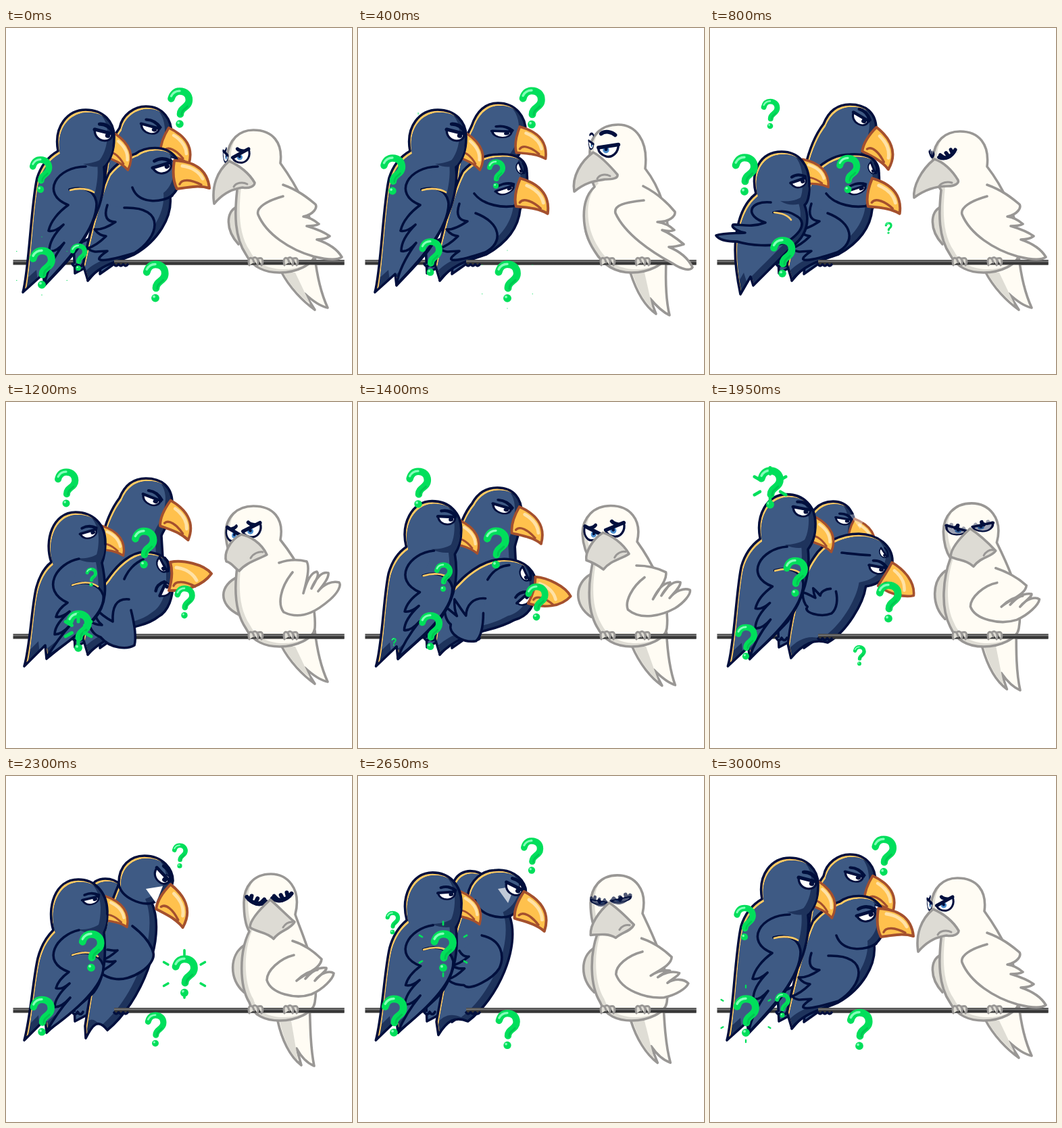
An HTML page for the animation above (3050 ms loop, 512 by 512 pixels).

```html
<!DOCTYPE html>
<html lang="en">
<head>
<meta charset="utf-8">
<title>Birds on a wire</title>
<style>
html, body { margin: 0; width: 100%; height: 100%; overflow: hidden; background: #fff; }
svg { display: block; width: 100vw; height: 100vh; }
path, use { stroke-linecap: round; stroke-linejoin: round; }
.ink { stroke: #000f3d; stroke-width: 3.6; }
.gray { stroke: #999795; stroke-width: 3.6; }
.none { fill: none; }
.blue { fill: #3e5a84; }
.navy { fill: #1e335c; }
.gold { fill: #ffca64; }
.glow { fill: none; stroke: #ffca64; stroke-width: 2.6; }
.bill { fill: #ffc14d; stroke: #a4502e; stroke-width: 4; }
.cream { fill: #fffcf4; }
.stone { fill: #dfddd5; }
.brow { fill: none; stroke: #000f3d; stroke-width: 6; }
</style>
</head>
<body>
<svg viewBox="0 0 512 512">
<defs>
  <linearGradient id="steel" x2="0" y2="1">
    <stop stop-color="#3c3c3c"/><stop offset=".3" stop-color="#7a7a7a"/><stop offset=".6" stop-color="#333"/><stop offset="1" stop-color="#3c3c3c"/>
  </linearGradient>
  <path id="A"/><path id="B"/><path id="C"/><path id="W"/>
  <clipPath id="clipA"><use href="#A"/></clipPath>
  <clipPath id="clipB"><use href="#B"/></clipPath>
  <clipPath id="clipC"><use href="#C"/></clipPath>
  <clipPath id="clipW"><use href="#W"/></clipPath>
  <g id="gloss" fill="none">
    <path d="M11-13C25-11 36-4 41 6" stroke="#ffe2a6" stroke-width="5"/>
    <path d="M7 14C10 6 24 7 39 15" stroke="#a4502e" stroke-width="3.5"/>
  </g>
  <g id="beak">
    <path class="bill" d="M-1-21C25-20 48-10 51 20C35 15 18 19 3 21C-4 8-3-8-1-21Z"/>
    <use href="#gloss"/>
  </g>
  <g id="eye">
    <path class="ink" fill="#fff" d="M-14-8L14-3C14 8 6 11 0 10C-8 9-14 2-14-8Z"/>
    <circle cx="7" cy="1" r="4" fill="#000f3d"/>
    <path class="brow" d="M-14-8L14-3M-7-18C1-19 9-15 15-6" stroke-width="5"/>
  </g>
  <g id="paleEye">
    <g id="open">
      <path class="ink" fill="#fff" d="M-15 0L15-9C17 4 8 13-1 12C-9 11-15 6-15 0Z"/>
      <circle cx="-3" cy="2" r="5" fill="#4b8fd0"/>
      <circle cx="-3" cy="1" r="2.6" fill="#000f3d"/>
      <path class="brow" d="M-15 0L15-9"/>
    </g>
    <path class="brow" id="brow"/>
    <path class="brow" id="shut" d="M-14 0C-6 7 6 5 15-5M-6 3L-11-3M2 3L-1-4M9-1L8-7"/>
  </g>
  <g id="foot">
    <path class="stone" stroke="#999795" stroke-width="3" d="M-9 6C-13-6-4-9-2 2M-4-4C2-9 6 0 3 6M4-4C12-7 12 2 9 6"/>
  </g>
  <g id="mark">
    <path d="M-13-14C-11-22-6-25.5 0-25.5C9-25.5 14.5-20 14.5-12C14.5 0 1-1 1 10" fill="none" stroke="#00df5b" stroke-width="11"/>
    <path d="M12-2C8 3 3 3 3 11" fill="none" stroke="#00c752" stroke-width="3"/>
    <path d="M-13-18C-10-24-6-26 0-26" fill="none" stroke="#83ffb9" stroke-width="3.5"/>
    <circle cy="25" r="6" fill="#00df5b"/>
    <circle cx="-2" cy="23" r="2" fill="#83ffb9"/>
  </g>
</defs>

<rect x="10.5" y="343" width="490" height="7.5" fill="url(#steel)"/>

<g id="backBird"></g>
<use id="beakB" href="#beak"/><use id="eyeB" href="#eye"/>

<path class="ink blue" d="M102 363L100 322L150 300L166 345L139 364L140 352L121 374L119 354Z"/>
<g id="midBird"></g>
<path id="throat" fill="#fff" d="M207 167L232 163L222 188Z"/>
<path class="ink none" id="chinC"/>
<use id="eyeC2" href="#eye"/><use id="eyeC" href="#eye"/>
<g id="beakC"><path class="bill" id="billC"/><use href="#gloss"/></g>

<path class="gray stone" id="wingW2"/>
<path class="gray cream" id="tailW"/>
<path id="tailShade" class="stone"/>
<g id="paleBird"></g>
<rect x="160" y="343" width="340.5" height="7.5" fill="url(#steel)"/>
<path class="ink blue" d="M98 349q4 7 8 0q4 7 8 0M160 350q3 4 6 0m1 0q3 4 6 0m1 0q3 4 6 0"/>
<path class="ink blue" id="wingC"/>

<use id="beakA" href="#beak"/>
<g id="frontBird"></g>
<path class="navy" id="chinA"/>
<path class="ink blue" id="wingA"/><path class="glow" id="glowA"/>
<use id="eyeA" href="#eye"/>

<use href="#foot" x="369" y="345"/><use href="#foot" x="421" y="345"/>
<path class="gray cream" id="wingW"/>
<use id="eyeW2" href="#paleEye"/><use id="eyeW" href="#paleEye"/>
<path class="gray" fill="#dddbd4" id="beakW"/>
<path class="none" stroke="#999795" stroke-width="3" id="mouthW"/>
<g id="marks"></g>
</svg>

<script>
const LOOP = 3050, STEP = 50;
const $ = id => document.getElementById(id);
const number = /-?\d*\.?\d+/g;

// Rim light on the upper left, shade on the lower right.
const darkBird = id => `<g clip-path="url(#clip${id})">
  <use href="#${id}" class="gold"/><use href="#${id}" x="3" y="4" class="navy"/>
  <g clip-path="url(#clip${id})" transform="translate(-10 -6)"><use href="#${id}" x="13" y="10" class="blue"/></g>
  </g><use href="#${id}" class="ink none"/>`;
$('backBird').innerHTML = darkBird('B');
$('midBird').innerHTML = darkBird('C');
$('frontBird').innerHTML = darkBird('A');
$('paleBird').innerHTML = `<g clip-path="url(#clipW)"><use href="#W" class="stone"/>
  <use href="#W" x="6" y="-5" class="cream"/></g><use href="#W" class="gray none"/>`;

// Six poses per part; a plain number repeats an earlier pose.
const tracks = [];
const track = (attr, id, poses) =>
  tracks.push({ attr, el: $(id), poses: poses.map(p => typeof p === 'number' ? poses[p] : p) });
const shape = (id, ...poses) => track('d', id, poses);
const fade = (id, ...poses) => track('opacity', id, poses);
const place = (id, ...poses) => track('transform', id, poses.map(p => {
  if (typeof p === 'number') return p;
  const [x, y, r, s, k = s] = p.split(' ');
  return `translate(${x} ${y}) rotate(${r}) scale(${s} ${k})`;
}));

// Front dark bird
shape('A',
  'M25 391C34 360 37 260 46 222C52 203 63 190 77 182C70 145 92 121 118 121C143 121 161 138 160 163C160 182 154 196 145 206C149 240 135 285 105 328C92 345 75 362 57 381L55 364Z', 0,
  'M45 394C38 360 36 330 38 312C42 275 55 255 68 245C60 215 72 183 106 183C130 183 148 200 147 235C147 250 145 258 140 262C150 290 140 310 120 325C100 345 85 360 64 381L60 368Z',
  'M27 391C36 360 38 300 45 274C50 256 58 244 67 237C56 205 69 163 103 163C128 163 147 180 147 208C147 222 145 230 142 238C149 272 150 300 130 322C105 345 87 357 60 380L58 360Z',
  'M26 391C36 360 38 262 46 226C52 207 63 194 77 186C72 150 92 126 118 126C143 126 161 143 160 168C160 187 154 200 145 209C149 242 135 285 105 328C92 345 75 362 58 381L56 364Z',
  'M27 391C36 360 40 300 47 270C52 250 60 238 70 228C60 195 72 153 107 153C130 153 149 170 150 200C150 215 148 225 145 232C149 270 145 300 130 320C105 345 85 355 60 380L58 360Z');
shape('chinA', 'M114 201C128 207 138 206 146 203C154 193 157 184 158 174C152 190 138 200 114 201Z', 0,
  'M104 256C116 264 130 262 139 258C144 250 146 244 146 234C142 250 128 258 104 256Z',
  'M104 231C116 238 130 238 140 236C145 228 146 220 146 210C142 224 128 233 104 231Z', 0,
  'M106 227C120 234 134 233 143 231C148 223 149 214 149 204C144 219 130 228 106 227Z');
shape('wingA',
  'M118 205C75 205 50 245 92 262C78 272 66 286 63 300C70 302 78 297 85 291C72 304 64 318 64 330C72 332 80 325 86 318C70 340 60 360 57 380C85 350 134 300 134 260C132 238 110 234 94 239', 0,
  'M90 258C58 255 50 278 82 288C60 296 45 290 34 291C30 296 45 302 52 303C35 304 20 303 9 307C14 315 30 316 40 316C60 322 90 324 112 318C140 300 142 285 126 277C115 270 105 270 94 273',
  'M108 232C75 238 50 278 91 297C82 303 76 310 74 318C82 319 88 315 94 310C82 321 72 332 72 344C80 344 88 338 95 330C80 347 70 362 60 378C100 350 148 315 144 286C138 268 115 264 98 271', 0,
  'M108 228C75 235 50 275 93 290C82 298 76 306 74 314C82 316 88 312 94 307C82 318 72 330 72 342C80 342 88 336 95 328C80 345 70 360 60 378C100 350 147 310 144 280C138 262 115 258 98 265');
shape('glowA', 'M95 240C108 236 122 238 130 243', 0, 'M95 273C108 274 116 278 120 284',
  'M98 271C115 265 128 267 136 273', 0, 'M98 265C115 259 128 261 136 267');
place('beakA', '152 172 32 .87', 0, '135 212 9 .85', '138 200 16 .82', '152 181 34 .87', '143 195 17 .84');
place('eyeA', '144 158 5 .95 .85', 0, '132 229 -28 .8 .7', '123 195 -24 .85 .65', '142 147 17 .95 .85', '126 184 -20 .85 .6');

// Back dark bird
shape('B',
  'M146 225C150 190 155 165 168 148C172 128 190 116 207 116C232 116 246 135 245 160C244 180 235 190 225 200L205 265L135 295Z',
  'M146 215C150 185 158 165 168 145C176 122 190 111 207 111C232 111 250 130 248 158C246 178 238 190 228 200L205 265L135 295Z',
  'M141 205C148 175 158 155 168 142C176 122 190 113 207 113C230 113 246 125 246 150C244 180 232 190 230 198L234 265L135 295Z', 2,
  'M140 225C152 190 160 170 170 160C180 148 192 144 205 144C230 144 240 165 237 190C235 215 235 225 235 235L236 270L130 300Z',
  'M108 220C116 185 122 165 132 156C137 153 142 152 147 152C165 152 178 165 180 185C180 195 180 205 178 215L170 270L125 290Z');
place('beakB', '234 166 23 .93', '236 165 13 .92', '235 164 36 .98', '235 164 28 .97', '229 187 13 .95', '178 192 30 .6');
place('eyeB', '213 149 8 .95 .7', '213 156 -4 1 .6', '222 135 22 .9 .75', '215 145 14 .95 .7', '210 174 4 1 .6', '178 178 0 .5');

// Middle dark bird
shape('C',
  'M121 373L114 350C125 300 140 240 152 215C165 198 185 188 192 186C205 176 235 172 250 190C262 205 262 235 243 250C246 280 225 315 190 335C160 348 140 350 121 373Z',
  'M121 373L114 350C125 300 140 240 155 212C170 195 190 187 207 187C235 185 250 195 250 215C252 240 248 255 240 268C238 290 225 315 190 335C160 345 140 350 121 373Z', 1,
  'M121 373L114 350C120 310 130 285 150 262C165 240 185 222 205 222C235 222 248 240 247 262C248 290 240 310 225 318C210 330 195 330 185 335C165 345 145 350 121 373Z',
  'M121 373L114 350C118 310 128 285 145 275C170 255 200 245 230 245C260 246 285 262 285 288C284 310 268 326 240 328C220 335 205 342 190 343C165 345 145 350 121 373Z',
  'M118 388L117 370C125 320 140 220 167 160C166 132 185 118 205 118C232 118 247 138 247 155C245 170 232 182 216 188C238 240 200 335 150 376C136 358 128 368 118 388Z');
shape('wingC',
  'M150 262C144 280 150 287 162 287C150 295 140 299 131 298C137 306 142 307 148 308C138 318 130 323 121 326C130 334 137 330 150 330C120 350 150 345 190 333C225 312 240 264 175 266',
  'M150 260C144 278 150 285 162 286C150 294 140 299 131 298C137 306 142 307 148 308C138 318 130 323 121 326C130 334 137 330 150 330C120 350 150 345 188 332C216 318 212 288 174 274', 1,
  'M182 292C162 290 157 305 158 325C145 318 138 312 130 303C132 320 136 325 142 330C134 330 128 328 121 322C125 340 132 345 140 348C155 366 180 366 190 360C194 345 188 320 185 308',
  'M197 289C180 288 165 295 162 305C163 295 162 285 159 278C155 283 152 290 152 300C148 290 144 280 136 277C132 290 132 300 134 305C105 315 125 345 155 346C172 345 182 330 186 318',
  'M150 257C158 258 162 259 165 258C156 266 150 270 143 272C150 276 156 275 162 274C152 284 146 286 138 290C146 296 152 299 160 300C185 305 222 280 218 262C214 245 200 232 187 222');
shape('chinC', 'M187 236C196 262 232 258 246 248', 'M172 245C185 262 215 268 238 262', 1,
  'M175 262C180 250 190 238 203 233', 'M213 264C222 252 235 248 250 252', 'M167 160C170 180 200 192 216 188');
const side = 'M-1 -21C25 -20 48 -10 51 20C35 15 18 19 3 21C-4 8 -3 -8 -1 -21Z';
shape('billC', side, 0, 0, 'M2 -21C20 -25 52 -18 63 -4C50 14 25 22 0 21C4 8 6 -8 2 -21Z',
  'M2 -23C24 -24 50 -17 63 -4C54 18 25 27 0 22C4 8 6 -8 2 -23Z', side);
place('beakC', '250 217 0 1', '236 243 14 1', 1, '241 258 0 1', '275 304 28 .87', '232 178 36 1');
place('eyeC', '232 207 -25 .95 .8', '218 240 -24 .95 .55', 1, '236 278 -75 .75', '259 311 -20 .8 .6', '230 149 38 .95 .8');
place('eyeC2', '248 194 10 .3', '239 208 60 .6 .45', 1, '230 242 55 .8 .6', '266 272 60 .7 .5', '240 150 30 .3');
fade('throat', '0', 0, 0, 0, 0, '1');

// Pale bird
const belly = 'C365 355 385 362 405 362C430 362 455 350 457 335';
shape('W',
  `M342 240C338 275 338 310 355 335${belly}C460 290 435 240 406 200C410 170 395 151 366 151C345 151 330 165 327 190C327 215 335 230 342 240Z`,
  `M350 235C328 255 330 300 350 330${belly}C465 290 450 240 425 208C430 165 410 143 385 143C360 143 342 160 343 185C342 210 345 225 350 235Z`,
  `M342 240C338 275 338 310 355 335${belly}C460 290 437 240 410 205C414 172 398 153 370 153C348 153 332 167 330 192C329 215 335 230 342 240Z`,
  `M342 245C338 275 338 310 355 335${belly}C460 290 435 240 406 204C412 172 395 154 366 154C342 154 325 170 325 195C326 220 335 235 342 245Z`,
  `M353 232C345 260 338 300 352 330${belly}C465 290 440 240 422 210C432 175 410 153 384 153C358 153 341 172 341 195C342 215 348 225 353 232Z`,
  `M360 230C345 260 345 310 360 335${belly}C465 290 440 240 428 205C438 165 415 145 392 145C365 145 352 165 352 187C352 210 355 222 360 230Z`);
shape('tailW',
  'M407 360C420 385 440 405 457 417L442 393C455 405 465 412 476 414C465 390 460 365 457 338',
  'M403 362C412 390 425 412 441 423L432 400C442 412 450 420 461 425C455 400 455 370 456 345', 0, 0, 1,
  'M402 362C408 390 420 415 437 428L430 403C438 418 446 425 456 429C450 400 450 360 449 325');
shape('tailShade', 'M410 362C422 383 437 399 450 408L428 362Z', 'M406 363C414 388 424 406 436 416L424 362Z', 0, 0, 1,
  'M405 363C411 390 420 410 432 421L422 362Z');
shape('wingW2', 'M341 265C326 272 324 298 344 320', 'M345 250C332 265 332 300 345 320', 0,
  'M345 258C315 270 313 300 345 315', 'M345 250C327 265 325 300 345 322', 'M353 250C330 265 330 300 352 320');
shape('wingW',
  'M410 249C385 256 370 266 373 276C385 305 420 328 455 338C475 343 490 344 497 339C490 327 475 318 460 313C468 313 475 311 479 308C468 300 455 296 445 293C452 293 458 293 463 290C455 283 447 280 440 279C455 276 461 266 458 261C445 250 432 240 410 232',
  'M423 255C395 258 378 262 381 274C395 305 435 332 465 348C480 358 492 360 495 354C488 340 475 330 460 324C468 324 476 322 482 320C470 310 460 303 450 299C458 301 464 301 468 299C460 291 450 288 443 287C462 287 470 278 469 272C455 255 440 243 422 234', 0,
  'M424 252C405 275 402 300 411 311C440 325 465 305 480 292C490 283 497 272 493 267C482 264 470 270 462 280C470 270 478 260 477 253C467 250 458 262 452 276C460 262 464 255 460 251C452 252 445 265 440 283C445 265 450 245 445 236C430 232 415 234 404 238',
  'M424 269C405 272 385 290 385 303C392 322 430 330 455 322C472 315 488 300 489 292C484 288 470 290 460 303C470 292 478 288 477 284C465 282 452 290 445 300C455 290 460 287 464 287C450 288 440 295 432 303C445 292 468 285 469 272C455 260 437 252 422 247',
  'M426 265C405 270 386 288 386 302C392 322 428 331 452 323C470 315 484 300 485 292C480 288 466 290 457 303C467 292 475 288 474 284C462 282 450 290 443 300C452 290 457 287 461 287C448 288 438 295 430 303C443 292 466 285 467 271C453 257 437 248 424 244');
shape('beakW',
  'M330 197C312 212 304 235 308 260C325 240 340 238 350 236C360 238 368 234 368 229C360 215 345 203 330 197Z',
  'M348 184C330 197 316 220 320 242C340 226 355 226 365 224C378 224 385 222 384 217C372 203 360 190 348 184Z',
  'M332 194C312 210 300 235 302 251C322 236 340 234 352 234C362 234 369 230 367 225C358 210 345 198 332 194Z',
  'M348 196C330 205 322 225 326 236C335 238 338 246 345 250C355 238 370 234 386 226C378 208 360 198 348 196Z',
  'M381 190C370 200 353 218 353 232C365 237 375 235 386 245C400 228 412 232 420 223C408 208 392 196 381 190Z',
  'M391 183C378 195 361 212 361 224C372 232 385 230 396 241C405 228 420 228 427 216C415 206 402 192 391 183Z');
shape('mouthW', 'M337 235C340 229 350 227 357 231', 'M354 223C358 216 367 216 373 219', 'M339 234C343 228 352 227 358 229',
  'M362 231C366 224 374 221 380 222', 'M402 229C404 224 411 219 416 221', 'M410 224C413 219 418 216 423 216');
place('eyeW', '348 189 -12 .85', '370 179 8 .95', '351 188 -15 .9', '364 189 -10 .9', '401 187 0 .95', '408 180 -4 1');
place('eyeW2', '325 189 0 -.25 .8', '345 172 0 -.25 .6', '328 187 0 -.25 .8', '336 195 10 -.7 .9', '360 192 6 -.95 .95', '371 185 4 -1 1');
place('open', '0 0 0 1', 0, '0 0 0 1 0', 0, 0, 2);
fade('shut', '0', 0, '1', 0, 0, 2);
const lash = 'M6 -7C2 -8 -2 -10 -4 -13';
shape('brow', lash, 'M-14 -22C-8 -28 2 -27 8 -23', 'M-5 3C-3 4 0 4 2 3', lash, lash, 2);

const cues = [[100, 350], [430, 690], [880, 1130], [1280, 1540], [1800, 2150], [2500, 2900]];
const smooth = p => p * p * (3 - 2 * p);
const clamp = v => Math.min(1, Math.max(0, v));

function blend(a, b, p) {
  const goal = b.match(number);
  let i = 0;
  return a.replace(number, v => (+v + (goal[i++] - v) * p).toFixed(2));
}

function drawBirds(t) {
  const next = cues.findIndex(c => t < c[1]);
  const i = next < 0 ? 0 : next;
  const p = next < 0 ? 0 : smooth(clamp((t - cues[i][0]) / (cues[i][1] - cues[i][0])));
  for (const { el, attr, poses } of tracks)
    el.setAttribute(attr, blend(poses[i], poses[(i + 1) % 6], p));
}

// x, y and birth time of each question mark
const marks = [
  [257, 118, 2000], [51, 217, 2380], [53, 355, 1330], [107, 339, 2700], [221, 375, 1728],
  [204, 216, 0], [89, 127, 380], [264, 296, 690], [126, 259, 1000]
].map(([x, y, born]) => {
  const g = document.createElementNS('http://www.w3.org/2000/svg', 'g');
  g.setAttribute('transform', `translate(${x} ${y})`);
  g.innerHTML = '<use href="#mark"/><path fill="none" stroke="#00df5b"/>';
  $('marks').append(g);
  return { born, glyph: g.firstChild, rays: g.lastChild };
});

function drawMarks(t) {
  for (const { born, glyph, rays } of marks) {
    const age = (t - born + LOOP) % LOOP;
    const size = (1 - Math.exp(-age / 330)) * clamp((1850 - age) / 110);
    glyph.setAttribute('transform', `scale(${size})`);
    const p = (age - 1530) / 195;
    let d = '';
    if (p > 0 && p < 1) {
      const r = 10 + 33 * (1 - (1 - p) ** 2), len = 12 * (1 - p);
      for (let k = 0; k < 6; k++) {
        const a = (k * 60 + 30) * Math.PI / 180, c = Math.cos(a), s = Math.sin(a);
        d += `M${c * (r - len / 2)} ${s * (r - len / 2) - 3}l${c * len} ${s * len}`;
      }
      rays.setAttribute('stroke-width', 1 + 4.5 * (1 - p));
    }
    rays.setAttribute('d', d);
  }
}

const start = performance.now();
function frame() {
  const t = Math.floor((performance.now() - start) % LOOP / STEP) * STEP;
  drawBirds(t);
  drawMarks(t);
  requestAnimationFrame(frame);
}
frame();
</script>
</body>
</html>
```
